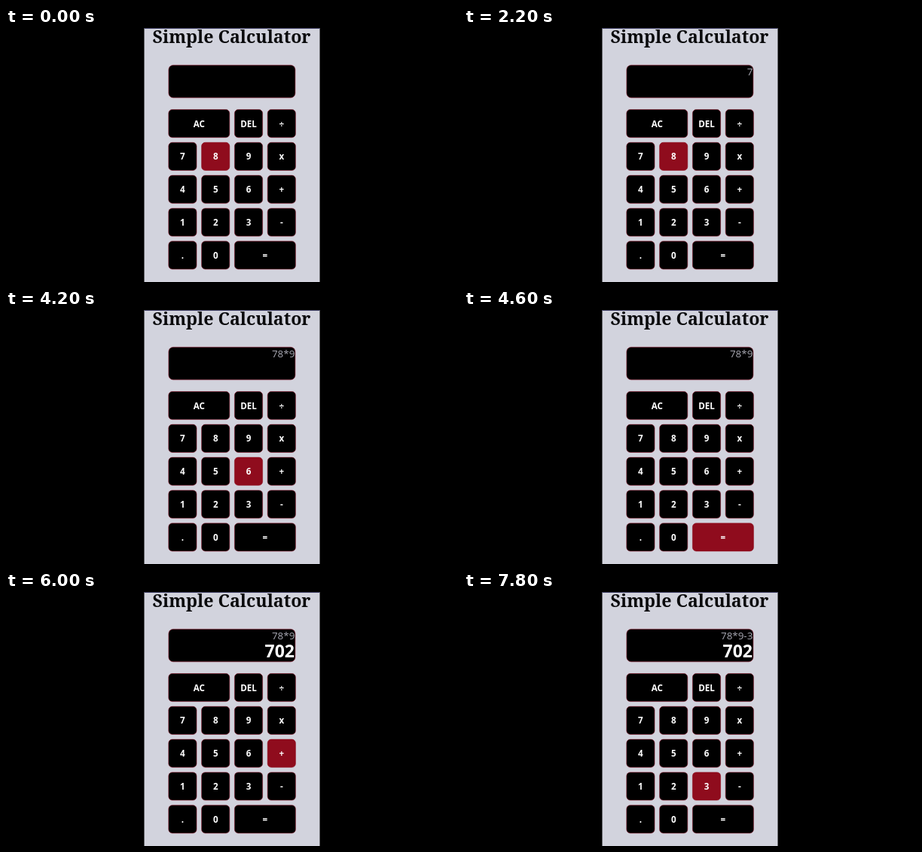
Animation of 600x338 px, one loop 8000 ms. Source, as an HTML page:

```html
<!DOCTYPE html>
<html lang="en">
<head>
<meta charset="utf-8">
<title>Simple Calculator</title>
<style>
  html, body { margin: 0; width: 100%; height: 100%; overflow: hidden; background: #000; }
  svg { display: block; width: 600px; height: 338px; }
  text { font-family: "Open Sans", "Noto Sans", sans-serif; fill: #fff; }
  .title { font: 700 23.2px "Noto Serif", Georgia, serif; fill: #0a0a0c; text-anchor: middle; }
  .box { fill: #000; stroke: #85162a; stroke-width: .6; }
  .key text { font-size: 11.6px; font-weight: 700; text-anchor: middle; }
  .key.lit .box { fill: #8f0c1d; stroke: #8f0c1d; }
  .entry { font-size: 13.4px; fill: #a9a9b3; text-anchor: end; }
  .result { font-size: 23px; font-weight: 700; text-anchor: end; }
</style>
</head>
<body>
<svg viewBox="0 0 600 338">
  <rect x="183.5" width="233" height="338" fill="#d2d3dd"/>
  <rect x="183.5" width="233" height="1" fill="#36365c"/>
  <text class="title" x="299.5" y="20">Simple Calculator</text>
  <rect class="box" x="215.9" y="49.4" width="168" height="43.4" rx="6"/>
  <text class="entry" x="383.3" y="63.2"></text>
  <text class="result" x="383" y="87"></text>
  <g id="keys"></g>
</svg>
<script>
  const NS = 'http://www.w3.org/2000/svg';
  const LOOP = 8000, PITCH = 43.8, SIZE = 37.2;

  // A repeated label makes one wide key.
  const rows = ['AC AC DEL ÷', '7 8 9 x', '4 5 6 +', '1 2 3 -', '. 0 = ='];

  // [start in ms, value]
  const hover = [
    [0, '8'], [100, '7'], [2200, '8'], [2800, '9'], [2900, 'x'], [3500, '9'],
    [4200, '6'], [4400, '3'], [4500, '='], [5300, ''], [5500, '-'], [5700, '+'],
    [6600, ''], [6800, '-'], [7300, '3']
  ];
  const entry = [
    [0, ''], [1900, '7'], [2500, '78'], [3300, '78*'], [4000, '78*9'],
    [7000, '78*9-'], [7800, '78*9-3']
  ];
  const result = [[0, ''], [5000, '702']];

  const keys = {};
  const keyLayer = document.getElementById('keys');
  const entryText = document.querySelector('.entry');
  const resultText = document.querySelector('.result');

  function add(parent, tag, attrs) {
    const el = document.createElementNS(NS, tag);
    for (const name in attrs) el.setAttribute(name, attrs[name]);
    return parent.appendChild(el);
  }

  function addKey(label, col, row, span) {
    const x = 215.8 + col * PITCH, y = 108.5 + row * PITCH;
    const width = SIZE + (span - 1) * PITCH;
    const key = add(keyLayer, 'g', { class: 'key' });
    add(key, 'rect', { class: 'box', x, y, width, height: SIZE, rx: 5 });
    add(key, 'text', { x: x + width / 2, y: y + 23 }).textContent = label;
    keys[label] = key;
  }

  rows.forEach((line, row) => {
    const labels = line.split(' ');
    labels.forEach((label, col) => {
      if (label === labels[col - 1]) return;
      addKey(label, col, row, label === labels[col + 1] ? 2 : 1);
    });
  });

  function valueAt(track, t) {
    let value = '';
    for (const [start, v] of track) if (t >= start) value = v;
    return value;
  }

  const begin = performance.now();

  function draw(now) {
    const t = Math.max(0, now - begin) % LOOP;
    const lit = valueAt(hover, t);
    for (const label in keys) keys[label].classList.toggle('lit', label === lit);
    entryText.textContent = valueAt(entry, t);
    resultText.textContent = valueAt(result, t);
    requestAnimationFrame(draw);
  }
  draw(begin);
</script>
</body>
</html>
```
